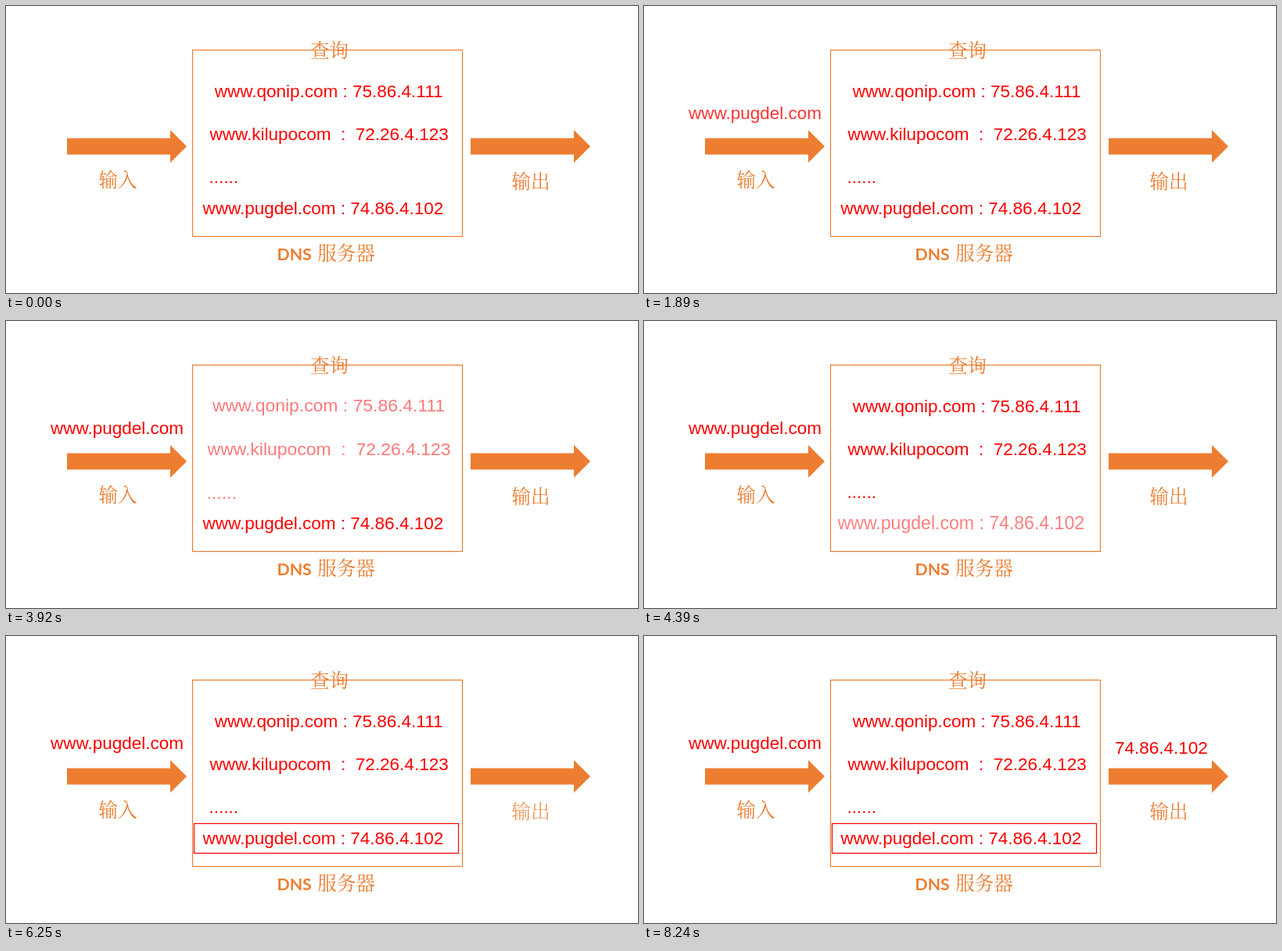
An HTML page with a canvas for the animation above (8.32 s loop, 808 by 368 pixels).

```html
<!DOCTYPE html>
<html lang="zh">
<head>
<meta charset="utf-8">
<title>DNS 查询</title>
<style>
html, body { margin: 0; width: 100%; height: 100%; overflow: hidden; background: #fff; }
canvas { display: block; }
</style>
</head>
<body>
<canvas id="stage" width="808" height="368"></canvas>
<script>
const ctx = document.getElementById('stage').getContext('2d');
const LOOP = 8320;
const ORANGE = '#ed7d31';
const RED = '#ff0000';
const LATIN = '22.5px "Liberation Sans", Arial, sans-serif';
const HAN = '500 24.5px "Noto Serif CJK SC", "Noto Sans CJK SC", "Noto Sans CJK", sans-serif';
const BOLD = 'bold 21.3px Lato, sans-serif';
const HOST = 'www.pugdel.com';
const IP = '74.86.4.102';

const clamp = v => Math.min(1, Math.max(0, v));
const progress = (t, start, length) => clamp((t - start) / length);

function text(str, x, y, font, color, align = 'left') {
  ctx.font = font;
  ctx.fillStyle = color;
  ctx.textAlign = align;
  ctx.fillText(str, x, y);
}

const red = (str, x, y) => text(str, x, y, LATIN, RED);
const han = (str, cx, cy) => text(str, cx, cy + 9, HAN, ORANGE, 'center');

function arrow(x, y) {
  ctx.fillStyle = ORANGE;
  ctx.beginPath();
  ctx.moveTo(x, y - 10.5);
  ctx.lineTo(x + 132, y - 10.5);
  ctx.lineTo(x + 132, y - 21);
  ctx.lineTo(x + 153, y);
  ctx.lineTo(x + 132, y + 21);
  ctx.lineTo(x + 132, y + 10.5);
  ctx.lineTo(x, y + 10.5);
  ctx.fill();
}

function frame(x, y, w, h, color) {
  ctx.lineWidth = 1.2;
  ctx.strokeStyle = color;
  ctx.strokeRect(x, y, w, h);
}

function faded(alpha, draw) {
  ctx.save();
  ctx.globalAlpha = alpha;
  draw();
  ctx.restore();
}

// Dips to half opacity while swelling by 5% about (cx, cy).
function pulse(t, start, cx, cy, draw) {
  const p = progress(t, start, 1020);
  const edge = Math.min(p, 1 - p);
  const scale = 1 + 0.1 * edge;
  faded(1 - 0.5 * clamp(edge / 0.2), () => {
    ctx.translate(cx, cy);
    ctx.scale(scale, scale);
    ctx.translate(-cx, -cy);
    draw();
  });
}

function render(t) {
  ctx.fillStyle = '#fff';
  ctx.fillRect(0, 0, 808, 368);

  frame(238.5, 56.5, 345, 239, ORANGE);
  arrow(78, 180);
  arrow(594, 180);
  text('DNS', 346.5, 326, BOLD, ORANGE);
  han('服务器', 435, 317);

  pulse(t, 0, 143, 223, () => han('输入', 143, 223));
  faded(progress(t, 1090, 1000), () => red(HOST, 57, 145));
  pulse(t, 2080, 413.5, 57, () => han('查询', 413.5, 57));
  pulse(t, 3095, 413.5, 164, () => {
    red('www.qonip.com : 75.86.4.111', 266.7, 117);
    red('www.kilupocom  :  72.26.4.123', 260.5, 172);
    red('......', 259.5, 227);
  });
  pulse(t, 4135, 405, 260, () => red(HOST + ' : ' + IP, 251.5, 267));
  faded(progress(t, 5160, 1000), () => frame(240.5, 240.5, 338, 38, RED));
  pulse(t, 6165, 671, 225, () => han('输出', 671, 225));

  const rise = progress(t, 7190, 1000);
  faded(rise, () => red(IP, 602, 151 + 80 * (1 - rise)));
}

function tick() {
  render(performance.now() % LOOP);
  requestAnimationFrame(tick);
}
tick();
</script>
</body>
</html>
```
